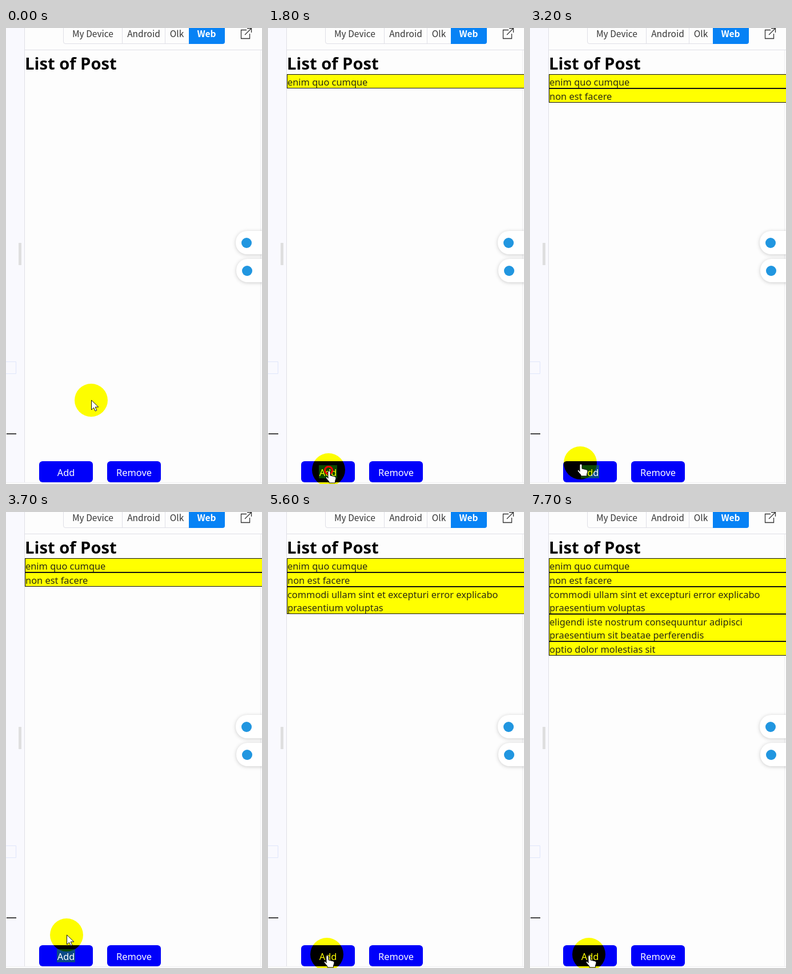
Animation of 448x800 px, one loop 8000 ms. Source, as an HTML page:

```html
<!DOCTYPE html>
<html lang="en">
<head>
<meta charset="utf-8">
<title>List of Post</title>
<style>
  html, body { margin: 0; width: 100%; height: 100%; overflow: hidden; background: #fdfdfd; }
  svg { display: block; font: 16.4px "Noto Sans", sans-serif; }
  .bar { font: 15.5px "Noto Sans CJK SC", "Noto Sans CJK JP", "Noto Sans", sans-serif; text-anchor: middle; fill: #333; }
  .line { fill: none; stroke: #dfdfe6; }
  .pill { fill: #fff; filter: drop-shadow(0 1px 3px #0003); }
  .button rect { fill: #0000fa; }
  .button text { fill: #fff; text-anchor: middle; }
  .post rect { fill: #ff0; stroke: #111; }
  .post text { fill: #2b2b12; }
  #spot { fill: #ff0; mix-blend-mode: multiply; }
  .pointer { fill: #fff; stroke: #111; stroke-linejoin: round; }
</style>
</head>
<body>
<svg width="448" height="800" viewBox="0 0 448 800">
  <rect width="448" height="800" fill="#fdfdfd"/>
  <rect width="32" height="797" fill="#f9f9fe"/>
  <path class="line" d="M32.5 0V797M32 38.5H448M100.5 0V24q0 3.500 3.500 3.500H320M203.500 0V27M278.500 0V27"/>
  <path class="line" d="M445.500 39V797M0 797.500H448" opacity=".5"/>
  <path d="M0 585.500H17.500V606.500H0" fill="none" stroke="#dfe6fa"/>
  <path d="M320 0H383V24q0 4-4 4H320z" fill="#0782f5"/>
  <g class="bar">
    <text x="152" y="16">My Device</text>
    <text x="241" y="16">Android</text>
    <text x="299" y="16">Olk</text>
    <text x="351" y="16" fill="#fff" font-weight="700">Web</text>
  </g>
  <path d="M421 3.500H411.500V18.500H426.500V10M418 12L429 1M422 .5H429.500V8" fill="none" stroke="#333" stroke-width="1.300"/>
  <rect x="22" y="377" width="5" height="39" fill="#dfdfdf"/>
  <rect x="1" y="711" width="17" height="2" fill="#444"/>

  <text x="33" y="73" font-size="29.200" font-weight="700">List of Post</text>
  <g id="posts"></g>

  <rect class="pill" x="402" y="356" width="70" height="41" rx="20"/>
  <rect class="pill" x="403" y="405" width="70" height="41" rx="20"/>
  <g fill="#2196e0"><circle cx="421" cy="377" r="9"/><circle cx="422" cy="426" r="9"/></g>

  <g class="button">
    <rect x="58" y="760" width="94" height="37" rx="6"/>
    <rect id="selection" x="89" y="767" width="32" height="23" style="fill:#0b4a86"/>
    <text x="105" y="786">Add</text>
    <rect x="177" y="760" width="94" height="37" rx="6"/>
    <text x="224" y="786">Remove</text>
  </g>

  <circle id="spot" r="29"/>
  <g id="cursor">
    <circle id="ring" cy="1" r="6.500" fill="none" stroke="#f00" stroke-width="3"/>
    <path id="arrow" class="pointer" d="M.5 0V17l4-4 2.700 6 2.600-1.200-2.600-5.800h5.600z"/>
    <path id="hand" class="pointer" d="M-1 15V4a2 2 0 0 1 4 0v6l8 2q2 .5 2 3l-1.500 5v3H1v-2l-6-7q1-3 4 0z"/>
  </g>
</svg>
<script>
const LOOP = 8000, STEP = 100;
const $ = id => document.getElementById(id);
const show = (el, on) => el.setAttribute('visibility', on ? 'visible' : 'hidden');

// Time each post arrives, followed by its lines
const posts = [
  [1200, 'enim quo cumque'],
  [2300, 'non est facere'],
  [5100, 'commodi ullam sint et excepturi error explicabo', 'praesentium voluptas'],
  [6500, 'eligendi iste nostrum consequuntur adipisci', 'praesentium sit beatae perferendis'],
  [7600, 'optio dolor molestias sit']
];
const clicks = [800, 1500, 1800, 4300, 5500, 6800, 7600];

// Pointer stops: time, x, y
const stops = [
  [0, 149, 653], [500, 106, 775], [1900, 106, 775], [2600, 138, 746],
  [2800, 117, 759], [3200, 88, 763], [3500, 107, 721],
  [4000, 104, 774], [4200, 103, 776], [LOOP, 103, 776]
];

let rowY = 81;
const rows = posts.map(([time, ...lines]) => {
  const height = 2 + 23 * lines.length;
  const text = lines.map((s, i) => `<text x="34" y="${rowY + 20 + 23 * i}">${s}</text>`).join('');
  $('posts').insertAdjacentHTML('beforeend',
    `<g class="post"><rect x="33.5" y="${rowY + .5}" width="420" height="${height - 1}"/>${text}</g>`);
  rowY += height;
  return { time, el: $('posts').lastElementChild };
});

function pointerAt(t) {
  const i = stops.findIndex(s => s[0] > t);
  const [t0, x0, y0] = stops[i - 1], [t1, x1, y1] = stops[i];
  const k = (t - t0) / (t1 - t0);
  return [x0 + (x1 - x0) * k, y0 + (y1 - y0) * k];
}

function draw(now) {
  const t = Math.floor(now % LOOP / STEP) * STEP;
  const [x, y] = pointerAt(t).map(Math.round);
  for (const id of ['spot', 'cursor']) $(id).setAttribute('transform', `translate(${x} ${y})`);
  const overButton = y >= 758;
  show($('hand'), overButton);
  show($('arrow'), !overButton);
  show($('ring'), clicks.includes(t));
  show($('selection'), t >= 1800 && t < 4200);
  rows.forEach(row => show(row.el, t >= row.time));
}

const start = performance.now();
function tick() {
  draw(performance.now() - start);
  requestAnimationFrame(tick);
}
tick();
</script>
</body>
</html>
```
